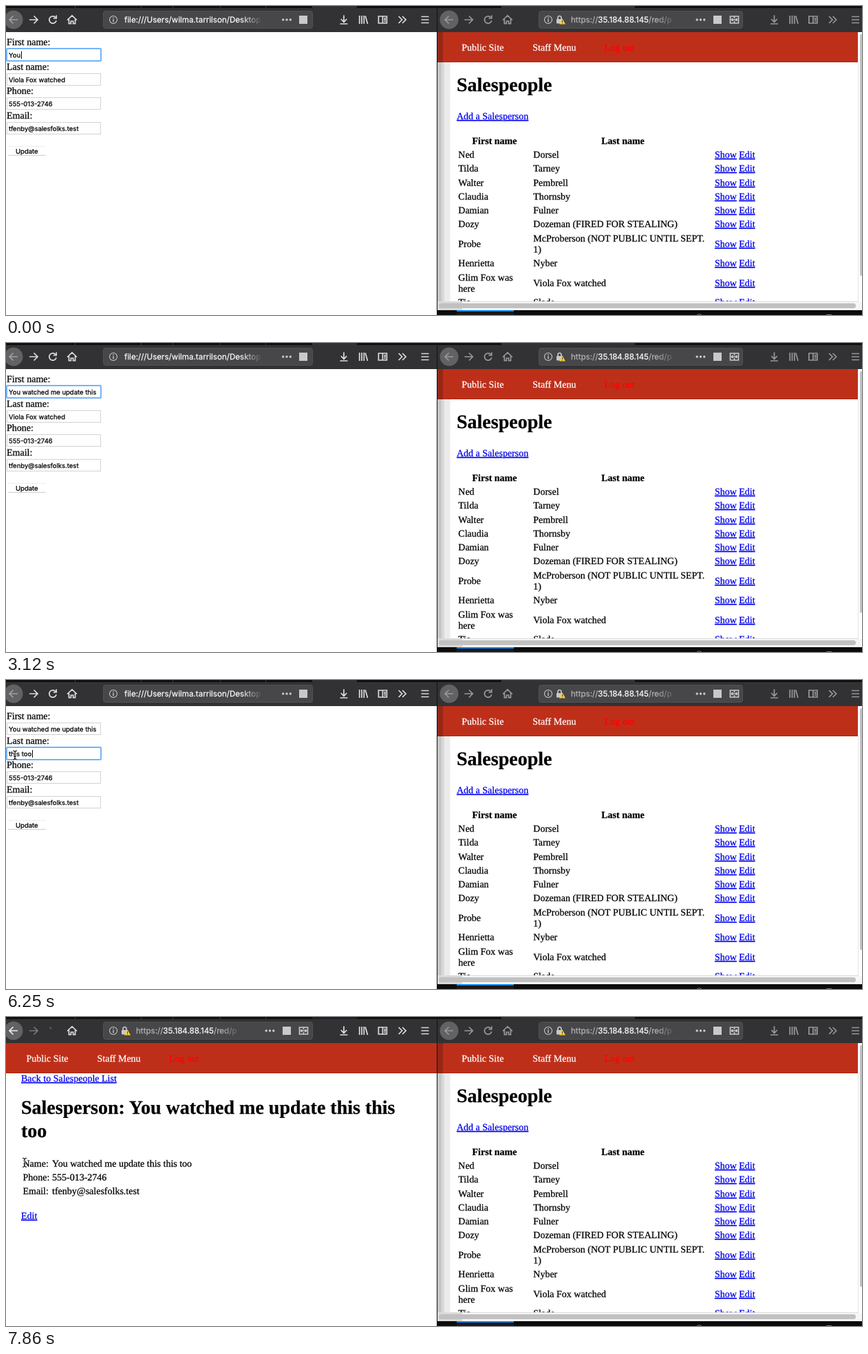
Animation, 1244 px wide and 450 px high, one loop 8 s. Source, as an HTML page:

```html
<!DOCTYPE html>
<html lang="en">
<head>
<meta charset="utf-8">
<title>Edit a salesperson</title>
<style>
html, body { margin: 0; width: 100%; height: 100%; overflow: hidden; background: #fff; }
svg { display: block; width: 100vw; height: 100vh; }
text {
  white-space: pre; font: 14px "Liberation Serif", Times, serif; text-rendering: geometricPrecision;
  fill: currentColor; stroke: currentColor; stroke-width: .25px;
}
.h1 { font-size: 28px; font-weight: bold; }
.th { font-weight: bold; text-anchor: middle; }
.link { color: #00e; text-decoration: underline; }
.ui { font: 9.5px Inter, sans-serif; }
.url { font: 11.6px Inter, sans-serif; color: #b1b1b3; }
.host { color: #f9f9fa; fill: #f9f9fa; stroke: #f9f9fa; }
.icon { fill: none; stroke: currentColor; stroke-width: 1.7; }
.field { fill: #fff; stroke: #d2d2d2; }
.focus { fill: none; stroke: #74b3f7; stroke-width: 2; }
</style>
</head>
<body>
<svg id="stage" viewBox="0 0 1244 450">
  <defs>
    <linearGradient id="fade">
      <stop stop-color="#474749" stop-opacity="0"/><stop offset="1" stop-color="#474749"/>
    </linearGradient>
    <clipPath id="list"><path d="M627 38H1244V430H627Z"/></clipPath>
  </defs>
</svg>
<script>
const stage = document.getElementById('stage');
const $ = id => document.getElementById(id);

const text = (x, y, s, cls = '', extra = '') => `<text x="${x}" y="${y}" class="${cls}" ${extra}>${s}</text>`;
const rect = (x, y, w, h, fill, extra = '') =>
  `<rect x="${x}" y="${y}" width="${w}" height="${h}" fill="${fill}" ${extra}/>`;
const group = (id, body, extra = '') => `<g id="${id}" ${extra}>${body}</g>`;

const shapes = {
  back: 'M6 0H-6M-.5-5.5L-6 0L-.5 5.5',
  forward: 'M-6 0H6M.5-5.5L6 0L.5 5.5',
  reload: 'M4-3.4A5.2 5.2 0 1 0 5.1 1.2M5.2-6.5V-2H.8',
  home: 'M-7 .5L0-6L7 .5M-4.6-1V5.6H-1.6V2H1.6V5.6H4.6V-1',
  download: 'M0-6.5V3M-4.2-1L0 3.4L4.2-1M-5.5 6H5.5',
  library: 'M-5.5-6V6M-2.2-6V6M1.1-6V6M3-5.5L6.3 6',
  sidebar: 'M-6-5H6V5H-6ZM0-5V5M2-2.2H4.5M2 .2H4.5M2 2.5H4.5',
  more: 'M-5-5L0 0L-5 5M.5-5L5.5 0L.5 5',
  menu: 'M-5.5-4.5H5.5M-5.5 0H5.5M-5.5 4.5H5.5',
  resize: 'M-6-5H6V5H-6ZM0-5V-2M0 2V5M-4 0H4M-2.3-1.8L-4 0L-2.3 1.8M2.3-1.8L4 0L2.3 1.8'
};
const icon = (name, x, color, extra = '') =>
  `<path class="icon" d="${shapes[name]}" transform="translate(${x} 20)" color="${color}" ${extra}/>`;

const soft = '#c9c9cb', bar = '#323234';
const info = x => `<g transform="translate(${x} 20)"><circle r="5.5" class="icon" style="stroke-width:1.1" color="${soft}"/>
  <path d="M0-1V3.2M0-3.4V-2" stroke="${soft}" stroke-width="1.4"/></g>`;
const warning = x => `<g transform="translate(${x} 20)">${rect(-6, -1, 9, 6.5, soft, 'rx="1"')}
  <path d="M-4-1V-3A2.5 2.5 0 0 1 1-3V-1" class="icon" color="${soft}"/>
  <path d="M2.5-1.5L7 6.5H-2Z" fill="#ffd02e"/><path d="M2.5 1V3.6M2.5 4.6V5.6" stroke="#333"/></g>`;
const dots = x => [-5.3, 0, 5.3].map(d => `<circle cx="${x + d}" cy="20" r="1.7" fill="${soft}"/>`).join('');
const badge = x => rect(x - 6, 14, 12, 12, soft);
const fade = (x, w = 28) => rect(x, 10, w, 20, 'url(#fade)');
const secureUrl = x => info(x) + warning(x + 18) +
  text(x + 33, 24, 'https://<tspan class="host">35.184.88.145</tspan>/red/p', 'url') + fade(x + 157, 30);

// Toolbar parts common to both windows
const toolbar = (x, w, boxX, boxW, tools, color) => rect(x, 0, w, 38, bar) + rect(x, 0, w, 3, '#0f0f11') +
  rect(boxX, 7.5, boxW, 25, '#474749', 'rx="3" stroke="#525254"') +
  ['download', 'library', 'sidebar', 'more'].map((n, i) => icon(n, tools + i * 28.2, color)).join('') +
  icon('menu', tools + 118, color);
const backDisc = x => `<circle cx="${x}" cy="20" r="13.5" fill="#626264"/>`;

const nav = (x, w) => rect(x, 38, w, 44, '#be2f1a') + rect(x, 81, w, 1, '#a82a15');
const navLinks = x => text(x, 65, 'Public Site', '', 'color="#fff"') +
  text(x + 103, 65, 'Staff Menu', '', 'color="#fff"') + text(x + 207.5, 65, 'Log out', '', 'color="#f00"');

const phone = '555-013-2746', email = 'tfenby@salesfolks.test';
const fullFirst = 'You watched me update this', fullLast = 'this too', oldLast = 'Viola Fox watched';

const fieldY = i => Math.round(62 + i * 35.6);
const form = ['First name:', 'Last name:', 'Phone:', 'Email:'].map((label, i) =>
  text(1, Math.round(57.4 + i * 35.4), label) +
  `<rect class="field" x="1.5" y="${fieldY(i) + .5}" width="136" height="17"/>`).join('') +
  rect(4, 101, 86, 12.5, '#b2d4fb', 'id="selection"') +
  text(4, 75, '', 'ui', 'id="first"') + text(4, 111, '', 'ui', 'id="last"') +
  text(4, 146, phone, 'ui') + text(4, 182, email, 'ui') +
  '<rect class="focus" id="focus" x="1" width="137" height="18" rx="1"/>' +
  rect(0, 0, 1, 11, '#000', 'id="caret"') +
  rect(3, 204, 55, 1, '#ededed') + rect(3, 217, 55, 1, '#cfcfcf') + text(14, 215, 'Update', 'ui');

const detail = nav(0, 626) + navLinks(29.5) + text(22, 94, 'Back to Salespeople List', 'link') +
  text(22, 141, 'Salesperson: You watched me update this this', 'h1') + text(22, 175, 'too', 'h1') +
  [['Name:', fullFirst + ' ' + fullLast], ['Phone:', phone], ['Email:', email]].map(([k, v], i) => {
    const y = Math.round(217.6 + i * 20.2);
    return text(24.5, y, k) + text(67, y, v);
  }).join('') + text(22, 294, 'Edit', 'link');

const leftBar = toolbar(0, 626, 141.5, 304, 491, '#dcdce0') +
  [100, 196, 242, 311, 377].map(x => rect(x, 0, 1, 3, '#3c3c3f')).join('') + rect(445, 0, 65, 3, bar, 'id="tab"') +
  backDisc(11) + icon('back', 11, '#a0a0a2', 'id="back"') + icon('forward', 40, '#dcdce0', 'id="forward"') +
  icon('home', 96, '#dcdce0') + icon('reload', 68, '#dcdce0', 'id="reload"') +
  '<path id="stop" class="icon" color="#aaaaad"/>' +
  group('fileBar', info(156) + text(172, 24, 'file:///Users/wilma.tarrilson/Desktop', 'url host') +
    fade(342, 30) + dots(408) + badge(432)) +
  group('webBar', secureUrl(156) + dots(383.5) + badge(408) + icon('resize', 432.5, soft, 'id="resize"'));

const rightBar = toolbar(627, 617, 774.5, 296, 1116.5, '#98989b') + rect(720, 0, 194, 3, bar) + backDisc(644) +
  ['back', 'forward', 'reload', 'home'].map((n, i) => icon(n, 644 + i * 28.3, '#98989b')).join('') +
  secureUrl(788) + dots(1009.5) + badge(1034) + icon('resize', 1058.5, soft);

// baseline, first name, last name; a slash breaks a cell over two lines
const people = [
  [221, 'Ned', 'Dorsel'], [241, 'Tilda', 'Tarney'], [262, 'Walter', 'Pembrell'], [282, 'Claudia', 'Thornsby'],
  [302, 'Damian', 'Fulner'], [322, 'Dozy', 'Dozeman (FIRED FOR STEALING)'],
  [351, 'Probe', 'McProberson (NOT PUBLIC UNTIL SEPT./1)'], [379, 'Henrietta', 'Nyber'],
  [408, 'Glim Fox was/here', oldLast], [436, 'Tia', 'Slade']
];
const cell = (x, y, s) => s.split('/').map((line, i, all) =>
  text(x, Math.round(y + (i - (all.length - 1) / 2) * 16.8), line)).join('');
const rightPage = nav(627, 611) + rect(627, 38, 8, 44, '#000', 'opacity=".2"') + navLinks(662.3) +
  rect(627, 82, 6, 348, '#c6c6c6') + rect(633, 82, 4, 348, '#d9d9d9') + rect(637, 82, 8.5, 348, '#ebebeb') +
  text(655, 124, 'Salespeople', 'h1') + text(655, 165, 'Add a Salesperson', 'link') +
  text(710, 201, 'First name', 'th') + text(896.5, 201, 'Last name', 'th') +
  people.map(([y, first, last]) => cell(657.3, y, first) + cell(766.3, y, last) +
    text(1030, y, 'Show', 'link') + text(1065.3, y, 'Edit', 'link')).join('');
const rightFrame = rect(1238, 82, 1, 349, '#e4e4e4') + rect(1241, 41, 4, 352, '#c1c1c1', 'rx="2"') +
  rect(627, 430, 612, 1, '#ddd') + rect(627, 431, 617, 12, '#f6f6f6') + rect(627, 431, 36, 12, '#d8d8d8') +
  rect(629, 433, 606, 7, '#c1c1c1', 'rx="3.5"') + rect(627, 443, 617, 7, '#0c0c0d') +
  rect(655, 443, 83, 2, '#0a84ff') + rect(655, 445, 83, 5, '#19191b') +
  '<path d="M1004 450Q1007.5 447 1011 450M1192 449.5H1200" fill="none" stroke="#77777a"/>';

const beam = 'M-3-6.5Q0-6.5 0-4V4Q0 6.5-3 6.5M3-6.5Q0-6.5 0-4M0 4Q0 6.5 3 6.5M-1.5 2H1.5';
stage.insertAdjacentHTML('beforeend', rect(0, 0, 1244, 450, '#fff') + group('form', form) + group('detail', detail) +
  leftBar + rightBar + group('page', rightPage, 'clip-path="url(#list)"') + rightFrame + rect(626, 0, 1, 450, '#111113') +
  group('cursor', `<path d="${beam}" class="icon" color="#fff" style="stroke-width:2.6"/>
    <path d="${beam}" class="icon" color="#000" style="stroke-width:1.1"/>`));

// [start time, value]
const firstKeys = [[0, 3], [150, 5], [300, 6], [440, 7], [740, 9], [890, 10], [1190, 11], [1340, 13], [1480, 15],
  [1780, 17], [1920, 18], [2220, 19], [2370, 20], [2520, 21], [2670, 23], [2820, 24], [2970, 25], [3120, 26]];
const lastKeys = [[4760, 1], [4910, 2], [5060, 3], [5210, 4], [5360, 6], [5510, 7], [5660, 8]];
const pointer = [[5950, [13, 110.5]], [6250, [13, 109.5]], [6400, [16, 137]], [6550, [25, 183]], [6690, [35, 220]], [6830, [27, 212]]];
const stopShapes = [[7430, 'M63 15L73 25M73 15L63 25'], [7570, 'M62.5 14.5L73.5 25.5'], [7720, 'M63 15L68 20'], [7860, 'M63.5 14.5L66 17.5']];
const at = (keys, t) => keys.filter(([start]) => start <= t).pop()?.[1];
const show = (id, on) => $(id).setAttribute('display', on ? 'inline' : 'none');
const set = (id, attrs) => { for (const k in attrs) $(id).setAttribute(k, attrs[k]); };

function draw(t) {
  const onLast = t >= 3710, blurred = t >= 7280, web = t >= 7430, loaded = t >= 7720;
  const typed = at(lastKeys, t), count = at(firstKeys, t);
  $('first').textContent = fullFirst.slice(0, count);
  $('last').textContent = typed ? fullLast.slice(0, typed) : oldLast;
  show('form', !loaded);
  show('detail', loaded);

  const active = $(onLast ? 'last' : 'first');
  show('focus', !blurred);
  set('focus', { y: fieldY(+onLast) });
  show('selection', onLast && !typed);
  show('caret', !blurred && (onLast ? typed : count < fullFirst.length));
  if (!loaded) {
    set('caret', { x: Math.round(4.5 + active.getComputedTextLength()), y: onLast ? 102 : 66 });
    set('selection', { width: $('last').getComputedTextLength() + 1 });
  }

  show('fileBar', !web);
  show('webBar', web);
  show('resize', loaded);
  show('reload', !web);
  show('stop', web);
  if (web) set('stop', { d: at(stopShapes, t), opacity: loaded ? .4 : 1 });
  set('back', { color: web ? '#f0f0f2' : '#a0a0a2' });
  set('forward', { color: web ? '#7b7b7e' : '#dcdce0' });
  set('tab', { fill: loaded ? '#1f2024' : bar });

  const place = at(pointer, t);
  show('cursor', place);
  if (place) set('cursor', { transform: `translate(${place})` });
}

function tick(now) {
  draw(now % 8000);
  requestAnimationFrame(tick);
}
draw(0);
requestAnimationFrame(tick);
</script>
</body>
</html>
```
